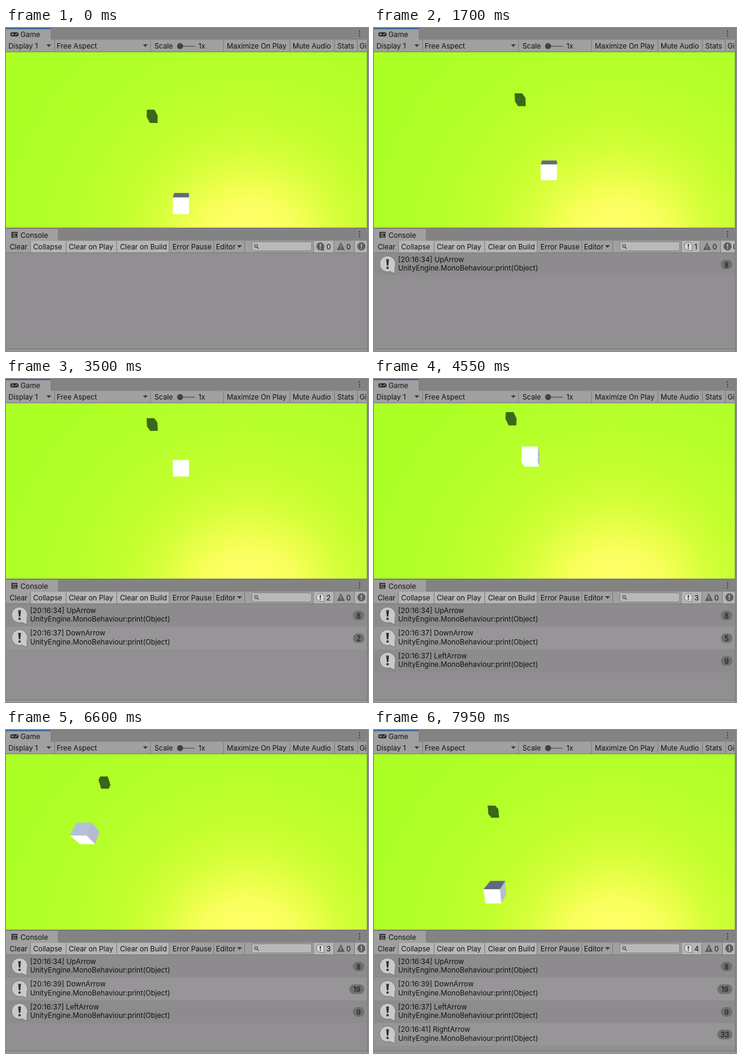
An HTML page with a canvas that plays this animation: 600 by 534 pixels, repeating every 8 s.

```html
<!DOCTYPE html>
<html lang="en">
<head>
<meta charset="utf-8">
<title>Cube control</title>
<style>
html, body { margin: 0; width: 100%; height: 100%; overflow: hidden; background: #918f91; }
canvas { display: block; }
</style>
</head>
<body>
<canvas id="stage" width="600" height="534"></canvas>
<script>
const ctx = document.getElementById('stage').getContext('2d');
const LOOP = 8000, STEP = 50, REPEAT = 36;
const INK = '#121212', EDGE = '#7b7b7b', BAR = '#838383', TOOL = '#a0a0a0', ON = '#b5b5b5';
const FONT = '11.77px Inter, Roboto, sans-serif';

// Each held key repeats and adds a little speed with every repeat.
const taps = [
  { key: 'Up', at: 20, n: 4, push: [0, .26], sec: 33 },
  { key: 'Up', at: 1100, n: 4, push: [0, .22], sec: 34 },
  { key: 'Down', at: 3455, n: 5, push: [0, -.25], sec: 37 },
  { key: 'Left', at: 3920, n: 9, push: [-.275, 0], sec: 37 },
  { key: 'Down', at: 5302, n: 7, push: [0, -.25], sec: 39 },
  { key: 'Down', at: 5940, n: 7, push: [0, -.25], sec: 39 },
  { key: 'Right', at: 6650, n: 30, push: [.255, 0], sec: 40 },
  { key: 'Right', at: 7730, n: 3, push: [.255, 0], sec: 41 }
];

const START = [-.38, -4.14], TILT = -4, SPIN = -99.6;
const FOCAL = 252, CAM = 10, WALL = 10;
const RAY = [-.42, .724, 1];
const rayLength = Math.hypot(...RAY);
const toLight = RAY.map(v => -v / rayLength);
const SIDE = [118, 116, 132], SKY = [95, 106, 128], SUN = [200, 225, 235];

function stateAt(ms) {
  const pos = START.slice(), log = new Map();
  for (const tap of taps) {
    for (let i = 0; i < tap.n; i++) {
      const age = ms - tap.at - i * REPEAT;
      if (age < 0) break;
      pos[0] += tap.push[0] * age / 1000;
      pos[1] += tap.push[1] * age / 1000;
      const count = log.has(tap.key) ? log.get(tap.key).count : 0;
      log.set(tap.key, { count: count + 1, sec: tap.sec });
    }
  }
  return { pos, angle: (TILT + SPIN * ms / 1000) * Math.PI / 180, log };
}

// Helpers
function box(x, y, w, h, fill) {
  ctx.fillStyle = fill;
  ctx.fillRect(x, y, w, h);
}

function pill(x, y, w, h, r, fill, stroke) {
  ctx.beginPath();
  ctx.roundRect(x, y, w, h, r);
  ctx.fillStyle = fill;
  ctx.fill();
  if (stroke) { ctx.strokeStyle = stroke; ctx.lineWidth = 1; ctx.stroke(); }
}

function disc(x, y, r, fill) {
  ctx.beginPath();
  ctx.arc(x, y, r, 0, 7);
  ctx.fillStyle = fill;
  ctx.fill();
}

function poly(points, fill) {
  ctx.beginPath();
  points.forEach(p => ctx.lineTo(p[0], p[1]));
  ctx.closePath();
  ctx.fillStyle = fill;
  ctx.fill();
}

function text(str, x, y, align = 'left') {
  ctx.font = FONT;
  ctx.textAlign = align;
  ctx.fillStyle = INK;
  ctx.fillText(str, x, y);
}

const caret = (x, y) => poly([[x - 4, y - 2], [x + 4, y - 2], [x, y + 2.5]], '#3c3c3c');
const rule = (x, y) => box(x, y, 1, 19, EDGE);

function bang(x, y, size, fill) {
  poly([[x - size * .16, y - size * .55], [x + size * .16, y - size * .55],
        [x + size * .09, y + size * .2], [x - size * .09, y + size * .2]], fill);
  disc(x, y + size * .45, size * .14, fill);
}

function bubble(x, y, r, fill, mark, edge) {
  ctx.beginPath();
  ctx.arc(x, y, r, 1.25, .35 + Math.PI * 2);
  ctx.lineTo(x + r * .92, y + r * 1.22);
  ctx.closePath();
  ctx.fillStyle = fill;
  ctx.fill();
  if (edge) { ctx.strokeStyle = edge; ctx.lineWidth = 1; ctx.stroke(); }
  bang(x, y, r * 1.08, mark);
}

// Scene
const project = ([x, y, z]) => [300 + FOCAL * x / (z + CAM), 185 - FOCAL * y / (z + CAM)];
const dot = (a, b) => a[0] * b[0] + a[1] * b[1] + a[2] * b[2];

function hull(points) {
  const sorted = points.slice().sort((a, b) => a[0] - b[0] || a[1] - b[1]);
  const chain = list => {
    const out = [];
    for (const p of list) {
      while (out.length > 1) {
        const [a, b] = out.slice(-2);
        if ((b[0] - a[0]) * (p[1] - a[1]) - (b[1] - a[1]) * (p[0] - a[0]) > 0) break;
        out.pop();
      }
      out.push(p);
    }
    return out.slice(0, -1);
  };
  return chain(sorted).concat(chain(sorted.reverse()));
}

// Ambient light fades from the sides to the sky; the sun adds to it.
function shade(normal) {
  const lit = Math.max(0, dot(normal, toLight));
  const up = Math.max(0, normal[1]);
  const rgb = SIDE.map((v, i) => v + (SKY[i] - v) * up + SUN[i] * lit);
  return `rgb(${rgb.map(v => Math.min(255, Math.round(v)))})`;
}

function drawCube({ pos, angle }) {
  const c = Math.cos(angle), s = Math.sin(angle);
  const turn = ([x, u, w]) => [x, u * c - w * s, -u * s - w * c];
  const place = v => {
    const p = turn(v);
    return [pos[0] + p[0], pos[1] + p[1], p[2]];
  };
  const corners = [];
  for (let i = 0; i < 8; i++) corners.push(place([(i & 1) - .5, (i >> 1 & 1) - .5, (i >> 2) - .5]));

  poly(hull(corners.map(p => {
    const k = WALL - p[2];
    return project([p[0] + RAY[0] * k, p[1] + RAY[1] * k, WALL]);
  })), '#3a671a');

  for (let axis = 0; axis < 3; axis++) {
    for (const side of [-1, 1]) {
      const dir = [0, 0, 0];
      dir[axis] = side;
      const normal = turn(dir);
      const mid = place(dir.map(v => v / 2));
      if (dot(normal, [-mid[0], -mid[1], -CAM - mid[2]]) <= 0) continue;
      const face = [[-1, -1], [1, -1], [1, 1], [-1, 1]].map(([a, b]) => {
        const v = [0, 0, 0];
        v[axis] = side / 2;
        v[(axis + 1) % 3] = a / 2;
        v[(axis + 2) % 3] = b / 2;
        return project(place(v));
      });
      poly(face, shade(normal));
      ctx.strokeStyle = ctx.fillStyle;
      ctx.lineWidth = .4;
      ctx.stroke();
    }
  }
}

const glow = ctx.createRadialGradient(402, 365, 0, 402, 365, 420);
[[0, 255, 115], [.1, 255, 105], [.2, 249, 92], [.27, 236, 76], [.38, 213, 57],
 [.5, 197, 48], [.7, 182, 42], [1, 172, 37]]
  .forEach(([at, r, b]) => glow.addColorStop(at, `rgb(${r},255,${b})`));

function drawScene(state) {
  ctx.save();
  ctx.beginPath();
  ctx.rect(0, 40, 599, 290);
  ctx.clip();
  box(0, 40, 600, 290, glow);
  drawCube(state);
  ctx.restore();
}

// Panels
function kebab(y) {
  for (let i = -1; i <= 1; i++) disc(586, y + i * 4, 1.1, '#333');
}

function drawGameBar() {
  box(0, 0, 600, 20, BAR);
  box(0, 0, 74, 20, TOOL);
  box(0, 0, 74, 2, '#3a669c');
  box(74, 0, 1, 19, EDGE);
  box(75, 0, 525, 1, EDGE);
  pill(7, 7, 14, 7, 3.5, '#303030');
  box(9, 10, 4, 1, TOOL);
  box(10.5, 8.5, 1, 4, TOOL);
  disc(16, 11.2, .9, TOOL);
  disc(18, 9.4, .9, TOOL);
  text('Game', 24, 14.5);
  kebab(9);

  box(0, 19, 600, 20, TOOL);
  box(75, 19, 525, 1, '#929292');
  box(0, 39, 600, 1, EDGE);
  [80, 239, 360, 470, 544, 582].forEach(x => rule(x, 20));
  [['Display 1', 4], ['Free Aspect', 84], ['Scale', 246], ['1x', 319], ['Maximize On Play', 366],
   ['Mute Audio', 475], ['Stats', 549], ['Gizmos', 586]].forEach(([s, x]) => text(s, x, 34));
  caret(71, 29);
  caret(231, 29);
  box(288, 29.5, 25, 1.3, '#555');
  disc(288.5, 30, 5, '#424242');
}

function drawCounters(total) {
  ctx.font = FONT;
  const live = total > 0;
  box(509, 352, 91, 19, ON);
  rule(509, 352);
  bubble(521, 361, 6.5, live ? '#d9d9d9' : '#5d5d5d', live ? '#333' : '#c4c4c4', live ? '#777' : null);
  text(String(total), 531, 365.5);

  const warn = Math.round(535.5 + ctx.measureText(String(total)).width);
  box(warn, 352, 34, 19, TOOL);
  rule(warn, 352);
  poly([[warn + 12, 354], [warn + 18.5, 367], [warn + 5.5, 367]], '#5d5d5d');
  bang(warn + 12, 362, 5.5, '#aaa');
  text('0', warn + 21, 365.5);

  rule(warn + 34, 352);
  const stop = [];
  for (let i = 0; i < 8; i++) {
    const a = (i + .5) * Math.PI / 4;
    stop.push([warn + 46 + 7 * Math.cos(a), 361 + 7 * Math.sin(a)]);
  }
  poly(stop, '#5d5d5d');
  bang(warn + 46, 361, 7, '#c0c0c0');
  text('0', warn + 55, 365.5);
}

function drawConsoleBar(total) {
  box(0, 330, 600, 2, EDGE);
  box(0, 332, 600, 19, BAR);
  box(0, 332, 86, 19, TOOL);
  box(86, 332, 1, 18, EDGE);
  box(9, 337, 10, 10, '#333');
  for (let i = 0; i < 3; i++) box(11, 339 + i * 3, i === 1 ? 5 : 7, 1, '#b0b0b0');
  text('Console', 24, 346.5);
  kebab(341);

  box(0, 351, 600, 20, TOOL);
  box(87, 351, 513, 1, '#929292');
  box(41, 352, 229, 19, ON);
  [40, 99, 183, 270, 344, 395].forEach(x => rule(x, 352));
  [['Clear', 6], ['Collapse', 45], ['Clear on Play', 104], ['Clear on Build', 189],
   ['Error Pause', 276], ['Editor', 348]].forEach(([s, x]) => text(s, x, 365.5));
  caret(387, 361);
  pill(407.5, 353.5, 99, 15, 3, '#b9b9b9', '#818181');
  ctx.strokeStyle = '#4a4a4a';
  ctx.lineWidth = 1.2;
  ctx.beginPath();
  ctx.arc(414.5, 360.5, 2.3, 0, 7);
  ctx.moveTo(416.2, 362.2);
  ctx.lineTo(419, 365);
  ctx.stroke();
  drawCounters(total);
  box(0, 371, 600, 1, EDGE);
}

function drawRow(i, key, { count, sec }) {
  const y = 372 + i * 37.5;
  box(0, y, 600, 37.5, i % 2 ? '#979597' : '#8d8b8d');
  bubble(22.5, y + 18, 13.2, '#c9c9c9', '#303030', '#747474');
  text(`[20:16:${sec}] ${key}Arrow`, 40, y + 14.5);
  text('UnityEngine.MonoBehaviour:print(Object)', 40, y + 29);
  const w = count > 9 ? 25 : 19;
  pill(594 - w, y + 11, w, 16, 8, '#6f6f6f');
  text(String(count), 594 - w / 2, y + 23.5, 'center');
}

function draw(ms) {
  const state = stateAt(ms);
  box(0, 0, 600, 534, '#918f91');
  drawScene(state);
  drawGameBar();
  drawConsoleBar(state.log.size);
  let i = 0;
  for (const [key, entry] of state.log) drawRow(i++, key, entry);
  box(0, 530, 600, 1.5, EDGE);
  box(0, 531.5, 600, 2.5, '#9a999a');
  box(598, 0, 2, 534, '#828282');
}

const began = performance.now();
function tick() {
  const ms = (performance.now() - began) % LOOP;
  draw(Math.floor(ms / STEP) * STEP);
  requestAnimationFrame(tick);
}
tick();
</script>
</body>
</html>
```
